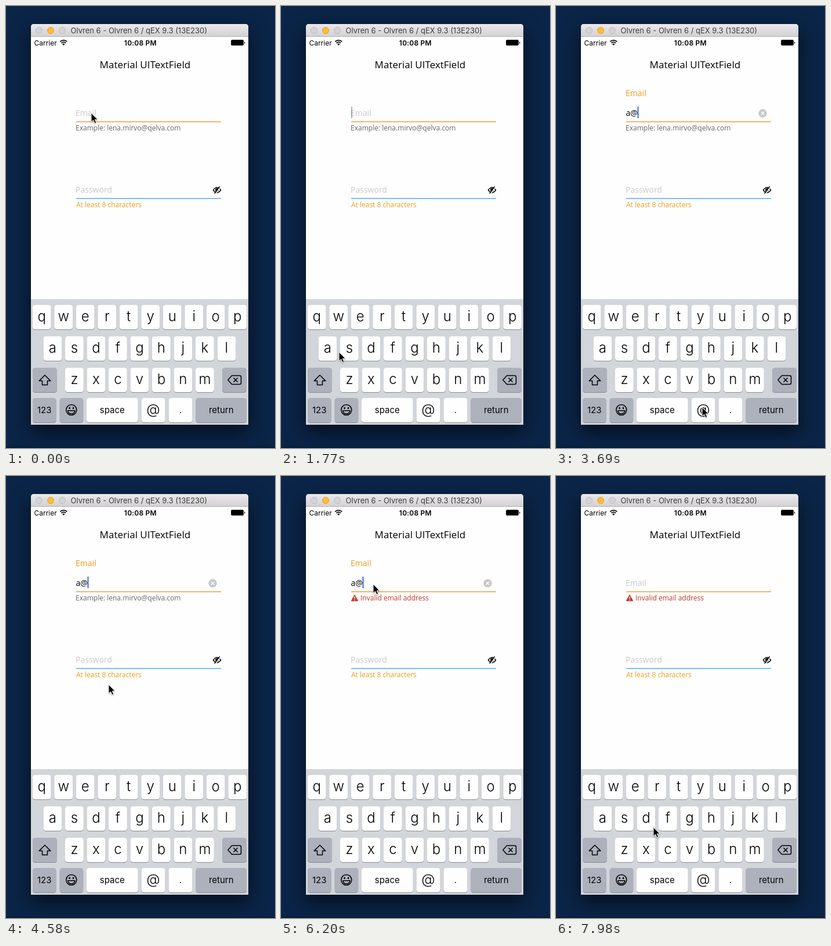
These frames come from a looping animation (464 by 760 pixels, 8 s). An HTML page:

```html
<!DOCTYPE html>
<html lang="en">
<head>
<meta charset="utf-8">
<title>Material text field</title>
<style>
html, body { margin: 0; width: 100%; height: 100%; overflow: hidden; }
body { position: relative; background: #0b2548; }
body::after { content: ""; position: absolute; left: 0; top: 758px; width: 464px; height: 2px; background: #071a35; }
.window { position: absolute; left: 43px; top: 31px; width: 375px; height: 689px;
  border-radius: 5px 5px 0 0; background: #fefefe; box-shadow: 0 13px 32px 2px rgba(0, 0, 0, .55); }
svg { position: absolute; left: 0; top: 0; z-index: 1; display: block; }
text { font-family: Inter, Roboto, sans-serif; white-space: pre; }
.form text { font-family: "Open Sans", "Noto Sans", sans-serif; font-size: 14px; }
.form .small { font-size: 12px; }
.form .heading { font-size: 17px; }
.hint { fill: #c9c9cd; }
.orange { fill: #ee9a1e; }
.red { fill: #c0392b; }
.keys text { text-anchor: middle; font-size: 15px; }
.keys .letter { font-size: 24px; font-weight: 300; }
.keys .big { font-size: 36px; font-weight: 300; }
.line { fill: none; stroke: #000; stroke-width: 1.5; stroke-linejoin: round; stroke-linecap: round; }
#pointer { filter: drop-shadow(0 1px 1px rgba(0, 0, 0, .35)); }
</style>
</head>
<body>
<div class="window"></div>
<svg width="464" height="760" viewBox="0 0 464 760">
  <defs>
    <linearGradient id="bar" x2="0" y2="1">
      <stop stop-color="#ebe9eb"/><stop offset="1" stop-color="#d2d0d2"/>
    </linearGradient>
  </defs>

  <path d="M43 53V36a5 5 0 0 1 5-5H413a5 5 0 0 1 5 5V53z" fill="url(#bar)"/>
  <path d="M43 52.5H418" stroke="#b5b3b5"/>
  <g fill="#d5d3d5" stroke="#bdbbbd">
    <circle cx="57" cy="42" r="5.5"/>
    <circle cx="77" cy="42" r="5.5" fill="#fdbc33" stroke="#e0a030"/>
    <circle cx="97" cy="42" r="5.5"/>
  </g>
  <text x="111.5" y="47" font-size="13" fill="#3d3d3d">Olvren 6 - Olvren 6 / qEX 9.3 (13E230)</text>

  <text x="48.5" y="67.5" font-size="12">Carrier</text>
  <path d="M99.3 67.8l-2.2-2.2a3.1 3.1 0 0 1 4.4 0z"/>
  <path d="M95.4 63.7a5.5 5.5 0 0 1 7.8 0M93.3 61.4a8.5 8.5 0 0 1 12 0" fill="none" stroke="#000" stroke-width="1.7"/>
  <text x="231.8" y="67.5" font-size="12" font-weight="600" letter-spacing=".2" text-anchor="middle">10:08 PM</text>
  <rect x="388.5" y="58.5" width="21" height="9" rx="1.5" stroke="#000" stroke-width=".8"/>
  <path d="M411 61.2a2 2 0 0 1 0 3.8z"/>

  <g class="form">
    <text class="heading" x="161.6" y="107">Material UITextField</text>

    <text id="label" class="orange" x="120" y="155">Email</text>
    <text id="emailHint" class="hint" x="120" y="189">Email</text>
    <text id="value" x="120.5" y="189"></text>
    <path d="M121 199H371" stroke="#f2b670" stroke-width="2"/>
    <g id="clear">
      <circle cx="356.5" cy="184.5" r="7.2" fill="#c7c7cb"/>
      <path d="M353.8 181.8l5.4 5.4m0-5.4l-5.4 5.4" stroke="#fff" stroke-width="1.6"/>
    </g>
    <text id="example" class="small" x="120" y="214" fill="#676767">Example: lena.mirvo@qelva.com</text>
    <g id="error">
      <path class="red" d="M127 204.8L132.3 214.6H121.7z" stroke="#c0392b" stroke-width="1.4" stroke-linejoin="round"/>
      <path d="M127 207.2v3.8m0 1.2v1.6" stroke="#fff" stroke-width="1.5"/>
      <text class="small red" x="137" y="214">Invalid email address</text>
    </g>

    <text class="hint" x="120" y="321">Password</text>
    <path d="M121 331H371" stroke="#7cc0f4" stroke-width="2"/>
    <text class="small orange" x="121" y="346">At least 8 characters</text>
    <path class="line" d="M357.5 316.5Q364 307.500 370.500 316.500Q364 325.500 357.500 316.500z" stroke-width="1.3"/>
    <circle cx="364" cy="316.300" r="3"/>
    <path d="M361.700 322.500L369.500 311.500" stroke="#fff" stroke-width="1.300"/>
    <path class="line" d="M360 322L368.200 310.800"/>
    <rect id="caret" width="2" height="20" fill="#4668e0"/>
  </g>

  <path d="M43 504H418V720H43z" fill="#d2d5da"/>
  <g class="keys">
    <g id="board"></g>
    <g id="emailRow">
      <circle class="line" cx="112.8" cy="694.5" r="9" stroke-width="1.4"/>
      <ellipse cx="109.6" cy="691.3" rx="1.2" ry="1.9"/>
      <ellipse cx="116" cy="691.3" rx="1.2" ry="1.9"/>
      <path class="line" d="M106.600 695.800H119a6.200 5.400 0 0 1-12.400 0z" stroke-width="1.300"/>
    </g>
    <g id="plainRow"></g>
    <path class="line" d="M67 634.800L76.800 644.600H71.500V651.500H62.500V644.600H57.200z"/>
    <path class="line" d="M389.500 635.500H403a2.500 2.500 0 0 1 2.500 2.500V648a2.500 2.500 0 0 1-2.500 2.500H389.500L382.800 643zM392.800 639.800l6.400 6.400m0-6.400l-6.400 6.400"/>
    <g id="popA"></g>
    <g id="popAt"></g>
  </g>

  <path id="pointer" d="M0 0V15.400L3.600 12.200L6 17.700L8.700 16.500L6.300 11.200H11.200z" stroke="#fff" stroke-width="1"/>
</svg>
<script>
const $ = id => document.getElementById(id);
const GREY = "#acb1bc";

const label = (text, x, y, cls = "") => `<text class="${cls}" x="${x}" y="${y}">${text}</text>`;

function key(x, y, w, text = "", fill = "#fefefe", cls = "") {
  const rect = (dy, color) => `<rect x="${x}" y="${y + dy}" width="${w}" height="42" rx="4.5" fill="${color}"/>`;
  return rect(1, "#898c91") + rect(0, fill) + label(text, x + w / 2, y + (cls ? 28 : 26), cls);
}

const letters = (row, x, y) =>
  [...row].map((c, i) => key(x + i * 37.5, y, 31.8, c, "#fefefe", "letter")).join("");

// Enlarged preview of a pressed key.
function balloon(x, y, w, text) {
  const r = x + w, out = 17;
  return `<path fill="#fefefe" stroke="#a4a7ac" stroke-width=".8" d="M${x} ${y + 37}V${y + 10}
    C${x} ${y} ${x - out} ${y + 2} ${x - out} ${y - 12}V${y - 46}q0-9 9-9H${r + out - 9}q9 0 9 9V${y - 12}
    C${r + out} ${y + 2} ${r} ${y} ${r} ${y + 10}V${y + 37}q0 5-5 5H${x + 5}q-5 0-5-5z"/>`
    + label(text, x + w / 2, y - 14, "big");
}

$("board").innerHTML =
  letters("qwertyuiop", 45.8, 514) + letters("asdfghjkl", 64.5, 568) + letters("zxcvbnm", 102, 622)
  + key(46, 622, 42, "", GREY) + key(373, 622, 42, "", GREY) + key(327.5, 674, 87.5, "return", GREY);
$("emailRow").insertAdjacentHTML("afterbegin",
  key(46, 674, 40.5, "123", GREY) + key(92.7, 674, 40.5, "", GREY) + key(139, 674, 88.7, "space")
  + key(233.5, 674, 41, "@", "#fefefe", "letter") + key(280.5, 674, 41, ".")); 
$("plainRow").innerHTML = key(46, 674, 87.3, ".?123", GREY) + key(139, 674, 182.5, "space");
$("popA").innerHTML = balloon(64.5, 568, 31.8, "a");
$("popAt").innerHTML = balloon(233.5, 674, 41, "@");

const LOOP = 8000, HOLD = 300, STEP = 7680 / 52, LEAD = 14;

// Pointer stops: step, x, y.
const path = [
  [-1, 147, 184], [3, 149, 186], [4, 205, 225], [5, 273, 390], [6, 180, 555], [7, 89, 595],
  [10, 100, 595], [12, 84, 592], [13, 84, 592], [15, 200, 660], [16, 245, 682], [18, 252, 690],
  [23, 252, 690], [27, 205, 440], [30, 163, 318], [36, 163, 318], [38, 159, 186],
  [42, 159, 186], [46, 351, 184], [47, 351, 184], [49, 265, 400], [51, 172, 599], [52, 168, 604]
];

function pointerAt(k) {
  const i = Math.max(1, path.findIndex(p => p[0] >= k));
  const [a, b] = [path[i - 1], path[i]];
  const u = (k - a[0]) / (b[0] - a[0]);
  return [1, 2].map(n => a[n] + (b[n] - a[n]) * u);
}

// Caret resets: first step, blink start in ms, x, y.
const carets = [
  [3, 850, 121, 173], [13, 2220, 128, 173], [21, 3400, 140.5, 173],
  [31, 4870, 121, 305], [38, 5910, 140.5, 173], [47, 7240, 121, 173]
];

function blink(ms) {
  const p = ((ms % 1000) + 1000) % 1000;
  if (p < 500) return 1;
  if (p < 650) return (650 - p) / 150;
  return p < 850 ? 0 : (p - 850) / 150;
}

const show = (id, on) => { $(id).style.opacity = +on; };
const clamp = v => Math.min(1, Math.max(0, v));

function draw(ms) {
  const k = Math.max(-1, Math.floor((ms - HOLD + LEAD) / STEP));
  const filled = k >= 13 && k < 47;
  const onPassword = k >= 31 && k < 38;
  const rise = filled ? clamp((k - 12) / 3) : clamp((49 - k) / 3) * (k >= 47);

  $("value").textContent = filled ? (k < 21 ? "a" : "a@") : "";
  show("emailHint", !filled);
  show("clear", filled && !onPassword);
  show("label", rise);
  $("label").setAttribute("y", 155 + 30 * (1 - rise) ** 2);
  show("example", k < 31);
  show("error", k >= 31);
  show("emailRow", !onPassword);
  show("plainRow", onPassword);
  show("popA", k === 12 || k === 13);
  show("popAt", k === 20 || k === 21);

  const caret = carets.filter(c => c[0] <= k).pop();
  show("caret", caret ? blink(HOLD + k * STEP - caret[1]) : 0);
  if (caret) {
    $("caret").setAttribute("x", caret[2]);
    $("caret").setAttribute("y", caret[3]);
  }
  $("pointer").setAttribute("transform", `translate(${pointerAt(k)})`);
}

const start = performance.now();
function tick(now) {
  draw(Math.max(0, now - start) % LOOP);
  requestAnimationFrame(tick);
}
draw(0);
requestAnimationFrame(tick);
</script>
</body>
</html>
```
